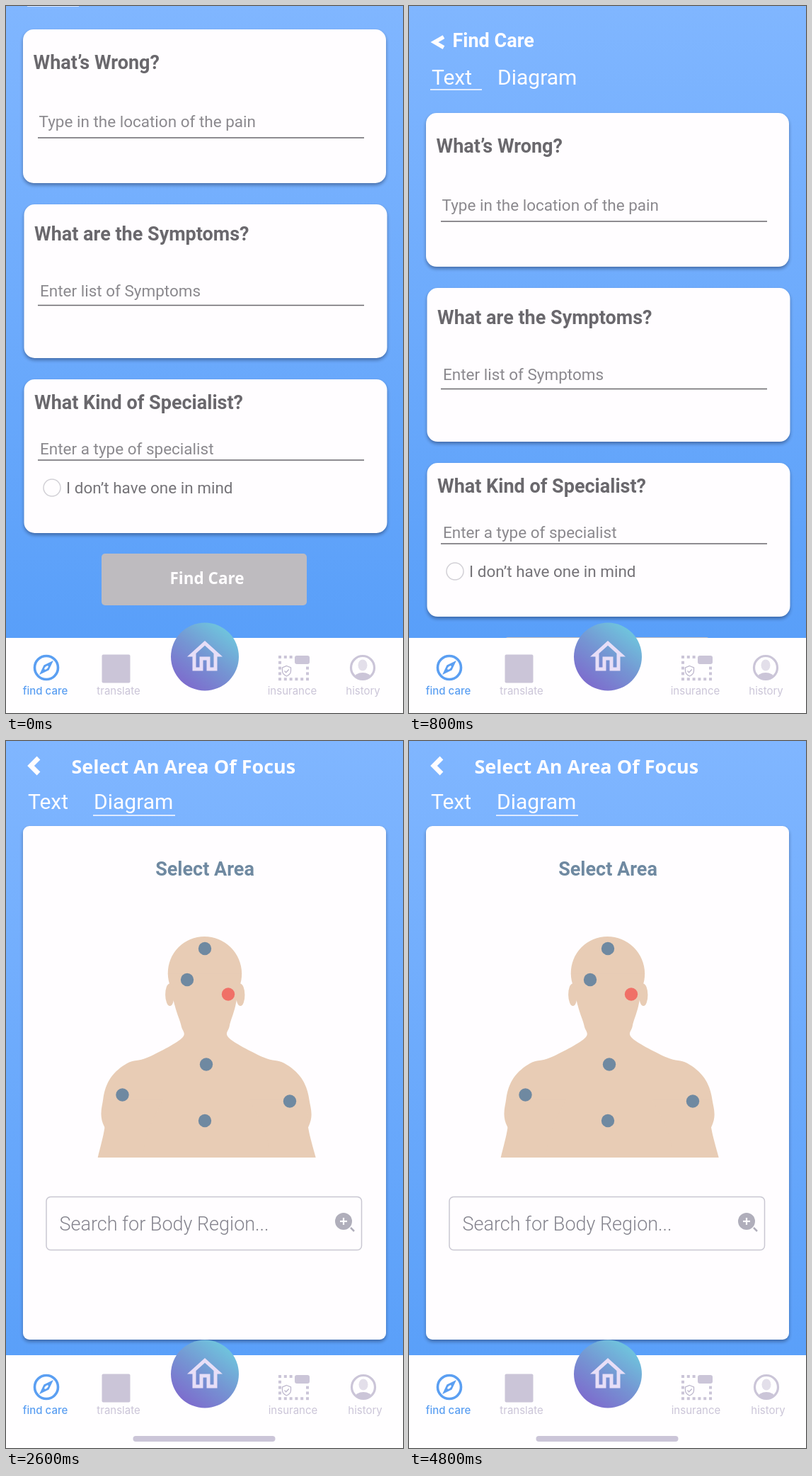
An HTML page with a canvas that plays this animation: 561 by 998 pixels, repeating every 5100 ms.

```html
<!DOCTYPE html>
<html lang="en">
<head>
<meta charset="utf-8">
<title>Find care</title>
<style>
  html, body { margin: 0; width: 100%; height: 100%; overflow: hidden; background: #6eaafc; }
  canvas { display: block; width: 561px; height: 998px; }
</style>
</head>
<body>
<canvas id="stage"></canvas>
<script>
const W = 561, H = 998, LOOP = 5100, STEP = 100;
const canvas = document.getElementById('stage');
const ratio = window.devicePixelRatio || 1;
canvas.width = W * ratio;
canvas.height = H * ratio;
const ctx = canvas.getContext('2d');

const WHITE = '#fffdff', GREY = '#6a686d', HINT = '#8b898e', LILAC = '#cbc5d8';
const BLUE = '#5b9ff2', SLATE = '#6f89a1', RED = '#f07067', SKIN = '#e8ccb5';
const ROBOTO = 'Roboto, sans-serif', OPEN = '"Open Sans", sans-serif', INTER = 'Inter, sans-serif';
const TAU = Math.PI * 2;

const HOUSE = new Path2D('M12 5.69l5 4.5V18h-2v-6H9v6H7v-7.81l5-4.5M12 3L2 12h3v8h6v-6h2v6h6v-8h3L12 3z');
const SHIELD = new Path2D('M0-7L6-4.5V0C6 3.5 3.5 6 0 7.5C-3.5 6-6 3.5-6 0V-4.5ZM-3 0L-.8 2.2L3.2-2');

// Key sections of the figure: height, centre, half width
const TRUNK = [[188, 0, 33], [217, 0, 27], [235, 0, 21.5], [246, 0, 21.5], [263, 0, 52], [268, 0, 70],
  [281, 0, 85], [300, 0, 92], [325, 0, 91], [361, 0, 60.5], [432, 0, 55.5], [475, 0, 62], [532, 0, 70]];
const ARM = [[300, 64, 26], [326, 71, 20], [362, 80, 19.5], [390, 87, 15], [420, 91, 18],
  [478, 104, 11], [500, 107, 16], [520, 108, 15]];
const LEG = [[526, 35.5, 35], [565, 40.5, 30.5], [608, 46.5, 20.5], [640, 49, 19.5],
  [685, 51, 23.5], [752, 59, 13.5], [798, 61, 14]];

function text(str, x, y, size, weight, family, color, align = 'left') {
  ctx.font = `${weight} ${size}px ${family}`;
  ctx.textAlign = align;
  ctx.fillStyle = color;
  ctx.fillText(str, x, y);
}
function rounded(x, y, w, h, r, color) {
  ctx.beginPath();
  ctx.roundRect(x, y, w, h, r);
  ctx.fillStyle = color;
  ctx.fill();
}
function rule(x1, x2, y, color) {
  ctx.fillStyle = color;
  ctx.fillRect(x1, y - 0.75, x2 - x1, 1.5);
}
function oval(x, y, rx, ry, color) {
  ctx.beginPath();
  ctx.ellipse(x, y, rx, ry, 0, 0, TAU);
  ctx.fillStyle = color;
  ctx.fill();
}
const disc = (x, y, r, color) => oval(x, y, r, r, color);
function ring(x, y, r, color, width) {
  ctx.beginPath();
  ctx.arc(x, y, r, 0, TAU);
  ctx.strokeStyle = color;
  ctx.lineWidth = width;
  ctx.stroke();
}
function stroke(pts, color, width, cap = 'butt') {
  ctx.beginPath();
  pts.forEach(p => ctx.lineTo(...p));
  ctx.strokeStyle = color;
  ctx.lineWidth = width;
  ctx.lineCap = cap;
  ctx.stroke();
}
function chevron(x, y, w, h, width) {
  stroke([[x + w, y - h], [x, y], [x + w, y + h]], WHITE, width);
}
function card(x, y, w, h, r) {
  ctx.save();
  ctx.shadowColor = 'rgba(30,50,90,.5)';
  ctx.shadowBlur = 5 * ratio;
  ctx.shadowOffsetY = 3 * ratio;
  rounded(x, y, w, h, r, WHITE);
  ctx.restore();
}
function backdrop() {
  const g = ctx.createLinearGradient(0, 0, 0, 890);
  g.addColorStop(0, '#80b6ff');
  g.addColorStop(1, '#599ff9');
  ctx.fillStyle = g;
  ctx.fillRect(0, 0, W, H);
}

// Smooth curve through all points
function spline(pts) {
  const at = i => pts[Math.max(0, Math.min(pts.length - 1, i))];
  ctx.lineTo(...pts[0]);
  for (let i = 0; i < pts.length - 1; i++) {
    const [a, b, c, d] = [at(i - 1), at(i), at(i + 1), at(i + 2)];
    ctx.bezierCurveTo(b[0] + (c[0] - a[0]) / 6, b[1] + (c[1] - a[1]) / 6,
      c[0] - (d[0] - b[0]) / 6, c[1] - (d[1] - b[1]) / 6, c[0], c[1]);
  }
}
function limb(sections) {
  const edge = side => sections.map(([y, mid, half]) => [mid + side * half, y]);
  ctx.beginPath();
  spline(edge(-1));
  spline(edge(1).reverse());
  ctx.fillStyle = SKIN;
  ctx.fill();
}
function taper(x1, y1, r1, x2, y2, r2) {
  const a = Math.atan2(y2 - y1, x2 - x1), q = Math.PI / 2;
  ctx.beginPath();
  ctx.arc(x1, y1, r1, a + q, a - q);
  ctx.arc(x2, y2, r2, a - q, a + q);
  ctx.fillStyle = SKIN;
  ctx.fill();
}
function figure() {
  ctx.save();
  ctx.transform(1, 0, 0.0105, 1, 271.7, 0);
  disc(0, 188, 33, SKIN);
  limb(TRUNK);
  for (const side of [1, -1]) {
    ctx.save();
    ctx.scale(side, 1);
    oval(31.5, 207, 4, 10, SKIN);
    limb(ARM);
    limb(LEG);
    taper(60, 794, 14, 104, 828, 11);
    taper(113, 490, 7, 130, 518, 2.5);
    for (let i = 0; i < 4; i++) taper(119 - i * 7, 515, 4, 121 - i * 8, 544 - (i - 1.5) ** 2, 2.5);
    ctx.restore();
  }
  ctx.restore();
}
function markers(spots, active) {
  spots.forEach(([x, y]) => disc(x, y, 9.2, SLATE));
  disc(...active, 9.2, RED);
}

function homeButton(y) {
  const g = ctx.createLinearGradient(252, y + 40, 310, y - 40);
  g.addColorStop(0, '#7d6ccd');
  g.addColorStop(0.5, '#7595d3');
  g.addColorStop(1, '#6fc5dd');
  disc(281, y, 48, g);
  ctx.save();
  ctx.translate(251, y - 30);
  ctx.scale(2.5, 2.5);
  ctx.fillStyle = '#e7def7';
  ctx.fill(HOUSE);
  ctx.restore();
}
function compassIcon(x, y) {
  ring(x, y, 16.5, BLUE, 3.6);
  ctx.save();
  ctx.translate(x, y);
  ctx.rotate(-Math.PI / 4);
  ctx.beginPath();
  for (const [px, py] of [[14, 0], [0, 5], [-14, 0], [0, -5]]) ctx.lineTo(px, py);
  ctx.fillStyle = BLUE;
  ctx.fill();
  oval(0, 0, 3.5, 1.6, WHITE);
  ctx.restore();
}
function insuranceIcon(x, y) {
  ctx.fillStyle = LILAC;
  for (let i = 0; i < 6; i++) {
    for (let j = 0; j < 5; j++) {
      const border = i % 5 === 0 || j % 4 === 0;
      const corner = i > 2 && j < 2;
      if (border && !corner) ctx.fillRect(x - 22 + i * 7.8, y - 17 + j * 7.8, 4, 4);
    }
  }
  rounded(x + 1, y - 17, 21, 12, 3, LILAC);
  ctx.save();
  ctx.translate(x - 10.5, y + 4.5);
  ctx.lineWidth = 1.3;
  ctx.strokeStyle = '#bdb7cc';
  ctx.stroke(SHIELD);
  ctx.restore();
}
function personIcon(x, y) {
  ctx.save();
  ctx.beginPath();
  ctx.arc(x, y, 16, 0, TAU);
  ctx.clip();
  oval(x, y + 15, 12, 8, LILAC);
  oval(x, y - 3.5, 6.5, 8, '#e3dfea');
  ctx.restore();
  ring(x, y, 16.5, LILAC, 3.2);
}
function navBar(top, iconY, nudge) {
  ctx.fillStyle = '#fffeff';
  ctx.fillRect(0, top, W, H - top);
  homeButton(top + 26.5);
  compassIcon(57, iconY);
  rounded(135.5, iconY - 18.5, 40, 40, 2, LILAC);
  insuranceIcon(407, iconY);
  personIcon(504 + nudge, iconY);
  const label = (str, x, weight, color) =>
    text(str, x, iconY + 37.5, 15, weight, INTER, color, 'center');
  label('find care', 55.5, 500, BLUE);
  label('translate', 159, 400, LILAC);
  label('insurance', 404.5 + nudge, 400, LILAC);
  label('history', 504.5 + nudge * 3, 400, LILAC);
}
function tabs(x, base) {
  text('Text', x, base, 30, 400, ROBOTO, WHITE);
  text('Diagram', x + 93, base, 30, 400, ROBOTO, WHITE);
}

function question(x, y, title, titleY, hint, hintY, lineY) {
  card(x, y, 513, 217, 15);
  text(title, x + 14.5, y + titleY, 27, 700, ROBOTO, GREY);
  text(hint, x + 22.5, y + hintY, 22.5, 400, ROBOTO, HINT);
  rule(45, 506, y + lineY, GREY);
}
function formScreen(offset) {
  ctx.save();
  ctx.translate(0, offset);
  chevron(36, -67, 13, 7.5, 5.5);
  text('Find Care', 61.5, -60, 27, 700, ROBOTO, WHITE);
  tabs(32, -7);
  rule(30, 103, 0, WHITE);

  question(24, 33, 'What’s Wrong?', 55.5, 'Type in the location of the pain', 138, 153);
  question(25.5, 280, 'What are the Symptoms?', 51, 'Enter list of Symptoms', 130, 142.5);
  question(25.5, 527, 'What Kind of Specialist?', 42, 'Enter a type of specialist', 106, 114);
  ring(65, 680, 12, '#d2d0d6', 1.5);
  text('I don’t have one in mind', 85, 688, 22.5, 400, ROBOTO, '#757378');

  rounded(135, 773, 290, 73, 5, '#bebbbf');
  text('Find Care', 231.5, 816, 22.5, 700, OPEN, WHITE);
  ctx.restore();
  navBar(892, 934, 0);
}

function diagramFrame(title, y) {
  ctx.fontKerning = 'none';
  text(title, 92.5, y + 52, 27, 700, OPEN, WHITE);
  ctx.fontKerning = 'auto';
  tabs(31, y + 102);
  rule(123, 239, y + 111, WHITE);
  card(24, y + 126, 513, 725, 9);
  navBar(867, 912, 1);
  rounded(179.5, 981, 201, 8, 4, LILAC);
}
function bodyScreen() {
  chevron(43.5, 40.5, 17, 19.5, 11);
  diagramFrame('Tell Us What’s Wrong', 0);
  figure();
  markers([[215, 296], [342.5, 296], [273.5, 369.5], [278, 495], [167.5, 499.5],
    [383, 495], [339.5, 670.5], [200.5, 805], [348.5, 799]], [275.5, 183]);
}
function bustScreen(flash) {
  chevron(35, 35, 11, 11, 6.8);
  diagramFrame('Select An Area Of Focus', -6);
  text('Select Area', 281, 190, 27, 700, ROBOTO, SLATE, 'center');

  // the same figure, closer and cropped at the chest
  ctx.save();
  ctx.beginPath();
  ctx.rect(0, 0, W, 588);
  ctx.clip();
  ctx.translate(-152, 30.8);
  ctx.scale(1.582, 1.582);
  figure();
  ctx.restore();
  markers([[281, 293], [256, 337], [283, 456.5], [164.5, 499.5], [401, 508.5], [281, 536]], [314, 357.5]);

  ctx.beginPath();
  ctx.roundRect(57, 643.5, 445.5, 75, 6);
  ctx.strokeStyle = '#c9c7d2';
  ctx.lineWidth = 1.5;
  ctx.stroke();
  text('Search for Body Region...', 75.5, 691, 27, 300, ROBOTO, '#84838d');
  disc(477, 678, 12, '#b0aebb');
  stroke([[472, 678], [482, 678]], WHITE, 2.2);
  stroke([[477, 673], [477, 683]], WHITE, 2.2);
  stroke([[487, 687], [492, 692]], '#b0aebb', 2.5);

  if (flash > 0) hotspots(flash);
}

function hotspots(alpha) {
  const glow = (cx, cy, w, h) => {
    ctx.fillRect(cx - w / 2, cy - h / 2, w, h);
    ctx.strokeRect(cx - w / 2 + 0.5, cy - h / 2 + 0.5, w - 1, h - 1);
  };
  ctx.save();
  ctx.globalAlpha = alpha;
  ctx.lineWidth = 1;
  ctx.fillStyle = 'rgba(0,185,255,.5)';
  ctx.strokeStyle = 'rgba(20,180,255,.7)';
  glow(39, 35, 18, 26);
  glow(135, 86, 222, 34);
  glow(314, 358, 18, 18);
  for (const x of [57, 505]) glow(x, 912, 36, 38);
  for (const x of [155, 407]) glow(x, 912.5, 48, 47);
  ctx.restore();
}

// Pull past the top, then spring back to rest
function scrollAt(t) {
  const peak = 169, rest = 107;
  if (t <= 400) return peak * Math.sin(t / 400 * Math.PI / 2) ** 2;
  const s = (t - 400) / 127;
  return rest + (peak - rest) * (1 + s) * Math.exp(-s);
}

function draw(now) {
  const t = Math.floor(now % LOOP / STEP) * STEP;
  ctx.setTransform(ratio, 0, 0, ratio, 0, 0);
  backdrop();
  if (t < 1600) formScreen(scrollAt(Math.min(t, 1200)));
  else if (t < 2600) bodyScreen();
  else bustScreen(t < 4000 ? 0 : 1 - (t - 4000) / 600);
}

const start = performance.now();
function tick() {
  draw(performance.now() - start);
  requestAnimationFrame(tick);
}
tick();
</script>
</body>
</html>
```
